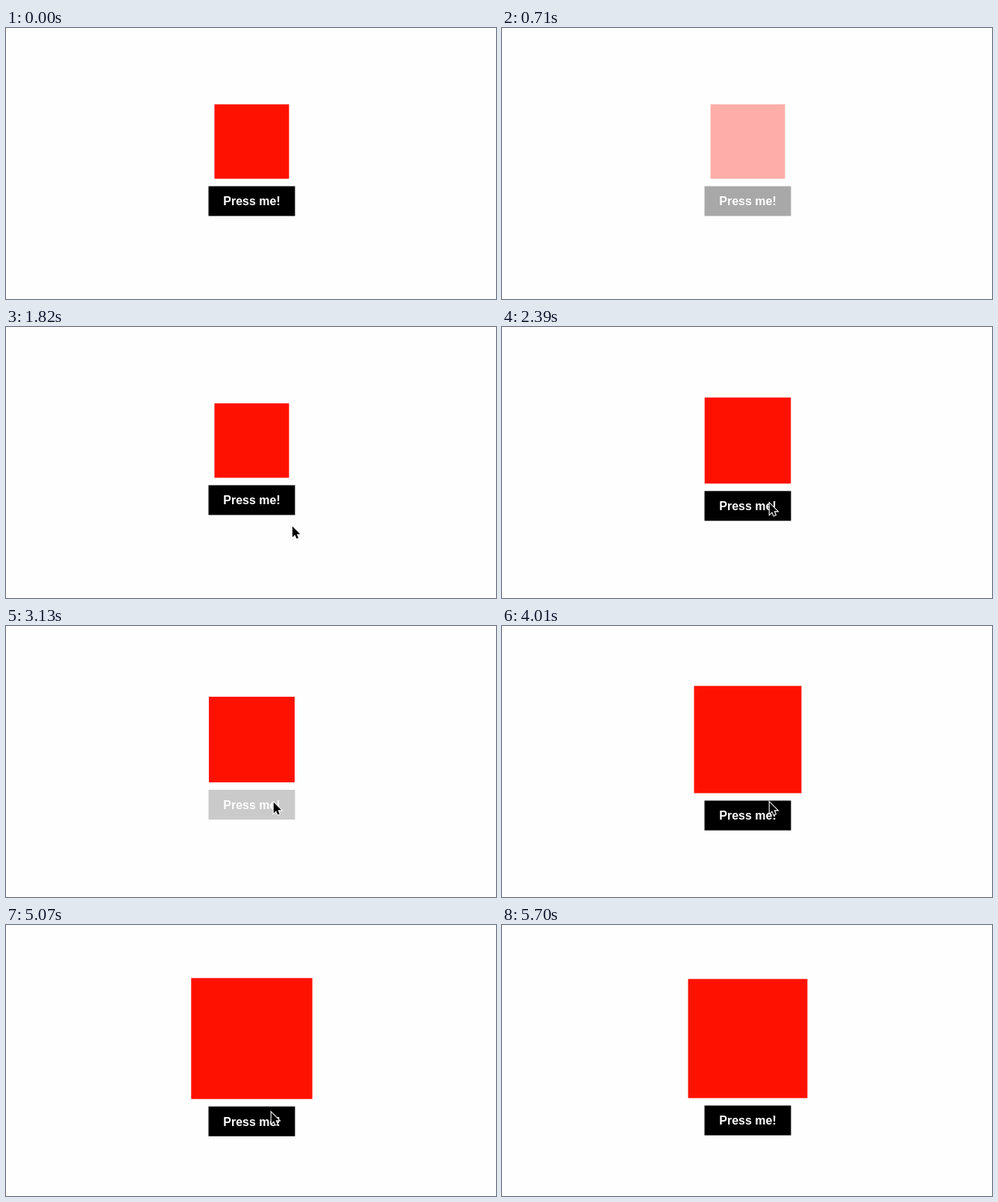
Write an HTML page that moves like this. It is 657 px wide and 364 px high and loops after 6.48 s.

```html
<!DOCTYPE html>
<html lang="en">
<head>
<meta charset="utf-8">
<title>Press me</title>
<style>
  html, body { margin: 0; width: 100%; height: 100%; overflow: hidden; background: #fefefe; }
  svg { display: block; width: 100vw; height: 100vh; }
  text { font: bold 16px "Liberation Sans", Arial, Helvetica, sans-serif; fill: #fff; }
</style>
</head>
<body>
<svg viewBox="0 0 657 364">
  <g id="app">
    <rect id="box" fill="#ff1100"/>
    <g id="button">
      <rect x="271.5" width="116" height="40"/>
      <text x="329.5" y="25.8" text-anchor="middle">Press me!</text>
    </g>
  </g>
  <path id="cursor" d="M0 0V14.6L3.4 11.4L5.6 16.6L8 15.6L5.8 10.5H10.4Z"
    stroke="#fff" stroke-width="2.2" stroke-linejoin="miter" paint-order="stroke"/>
</svg>
<script>
const LOOP = 6480;
const CX = 329.5, CY = 177.5, GAP = 10, BUTTON_H = 40;
const START_SIZE = 100, GROWTH = 15;

// each tap: [press, release]
const taps = [[2215, 2326], [3125, 3172], [3775, 3815], [4940, 4995]];

const $ = id => document.getElementById(id);
const app = $('app'), box = $('box'), button = $('button'), cursor = $('cursor');

const clamp = x => Math.min(1, Math.max(0, x));
const part = (t, from, to) => clamp((t - from) / (to - from));
const smooth = p => p * p * (3 - 2 * p);
const easeOut = p => 1 - (1 - p) ** 2.2;

// underdamped step response, damping ratio 0.4
function spring(ms) {
  if (ms <= 0) return 0;
  const s = ms / 1000, decay = 14, freq = 32;
  return 1 - Math.exp(-decay * s) * (Math.cos(freq * s) + decay / freq * Math.sin(freq * s));
}

function appOpacity(t) {
  if (t < 300) return 1;
  return easeOut(part(t, 610, 1210));
}

function cursorAt(t) {
  const enter = 1 - easeOut(part(t, 1640, 2180));
  const follow = smooth(part(t, 4450, 4880));
  const leave = smooth(part(t, 5090, 5710));
  return [
    358.8 + 62 * enter - 3 * follow + 257 * leave,
    236.8 + 76 * enter + 15 * follow + 118 * leave
  ];
}

function draw(t) {
  const size = taps.reduce((sum, [, up]) => sum + GROWTH * spring(t - up), START_SIZE);
  const top = CY - (size + GAP + BUTTON_H) / 2;
  const pressed = taps.some(([down, up]) => t >= down && t < up);
  const [x, y] = cursorAt(t);

  app.setAttribute('opacity', appOpacity(t));
  box.setAttribute('x', CX - size / 2);
  box.setAttribute('y', top);
  box.setAttribute('width', size);
  box.setAttribute('height', size);
  button.setAttribute('transform', `translate(0 ${top + size + GAP})`);
  button.setAttribute('opacity', pressed ? 0.2 : 1);
  cursor.setAttribute('transform', `translate(${x} ${y})`);
  cursor.setAttribute('visibility', t >= 1640 && t < 5700 ? 'visible' : 'hidden');
}

const began = performance.now();
function tick() {
  draw((performance.now() - began) % LOOP);
  requestAnimationFrame(tick);
}
draw(0);
requestAnimationFrame(tick);
</script>
</body>
</html>
```
